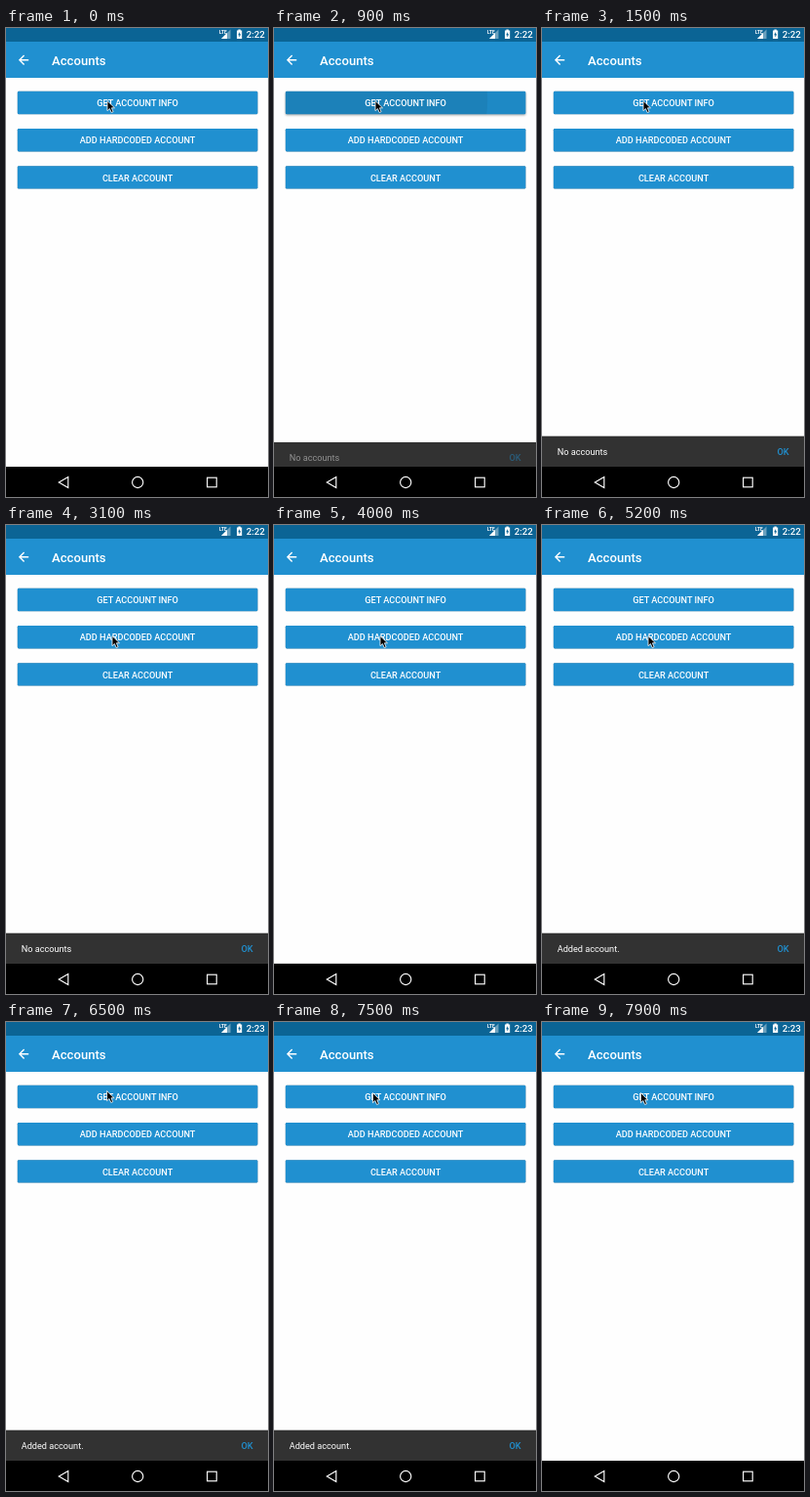
These frames come from a looping animation (269 by 480 pixels, 8 s). An HTML page:

```html
<!DOCTYPE html>
<html lang="en">
<head>
<meta charset="utf-8">
<title>Accounts</title>
<style>
  html, body { margin: 0; height: 100%; overflow: hidden; background: #fefefe; }
  svg { display: block; width: 100vw; height: 100vh; }
  text { font: 500 9.16px Roboto, sans-serif; fill: #fff; }
  .button text { text-anchor: middle; }
  .line { fill: none; stroke: #fff; stroke-width: 1.15; }
</style>
</head>
<body>
<svg viewBox="0 0 269 480">
  <rect width="269" height="480" fill="#fefefe"/>
  <rect width="269" height="51" fill="#2090d0"/>
  <rect width="269" height="14" fill="#0b6495"/>

  <!-- status bar -->
  <text x="219" y="5.6" style="font-size:4.8px;font-weight:700">LTE</text>
  <path d="M221 11H230.5V1.5Z" fill="#fff" opacity=".4"/>
  <path d="M221 11H227V5Z" fill="#fff"/>
  <path d="M237 2.6h1.4V1.6h2.4v1H242.2V11H237Z" fill="#fff"/>
  <path d="M240 4L238.2 7.3H239.4V9.8L241.2 6.3H240Z" fill="#0b6495"/>
  <text id="clock" x="265.8" y="10" text-anchor="end" style="font-size:9.7px">2:22</text>

  <!-- app bar -->
  <path class="line" style="stroke-width:1.4" d="M23.2 32.7H14M18.6 28L13.9 32.7L18.6 37.4"/>
  <text x="47" y="37.6" style="font-size:13.1px">Accounts</text>

  <g id="buttons"></g>

  <g id="snackbar">
    <rect y="449" width="269" height="32" fill="#323232"/>
    <g id="message">
      <text id="note" x="15.7" y="468.3" style="font-weight:400"></text>
      <text x="253.5" y="468.3" text-anchor="end" style="fill:#2090d0">OK</text>
    </g>
  </g>

  <!-- navigation bar -->
  <rect y="449" width="269" height="31"/>
  <path class="line" d="M54.3 465L63.8 459.6V470.4Z"/>
  <circle class="line" cx="135.2" cy="465" r="5.6"/>
  <rect class="line" x="206.6" y="460.2" width="9.6" height="9.6"/>

  <path id="cursor" d="M0 0V10.2L2.4 8L4.2 12L6.1 11.2L4.4 7.3H7.5Z" stroke="#fff" stroke-width=".8"/>
</svg>
<script>
const LOOP = 8000, STEP = 100;
const $ = id => document.getElementById(id);
const clamp = v => Math.min(1, Math.max(0, v));
const span = (t, start, length) => clamp((t - start) / length);

// cubic-bezier(.4, 0, .2, 1)
function ease(x) {
  let lo = 0, hi = 1;
  for (let i = 0; i < 20; i++) {
    const s = (lo + hi) / 2, r = 1 - s;
    if (1.2 * r * r * s + .6 * r * s * s + s ** 3 < x) lo = s; else hi = s;
  }
  return lo * lo * (3 - 2 * lo);
}

const buttons = [
  { label: 'GET ACCOUNT INFO', press: 600, touch: [104, 74] },
  { label: 'ADD HARDCODED ACCOUNT', press: 4400, touch: [109, 113.5] },
  { label: 'CLEAR ACCOUNT', press: Infinity, touch: [0, 0] }
];
const notes = [
  { text: 'No accounts', show: 770, hide: 3770 },
  { text: 'Added account.', show: 4570, hide: 7570 }
];
const moves = [
  { start: 2300, length: 800, to: [109, 113.5] },
  { start: 5700, length: 800, to: [103.6, 70.5] },
  { start: 6600, length: 300, to: [101.4, 72.5] }
];

$('buttons').innerHTML = buttons.map(({ label, touch: [x, y] }, i) => {
  const box = `<rect x="11.8" y="${64.8 + 38.2 * i}" width="246.6" height="23.4" rx="1.3"`;
  return `<clipPath id="clip${i}">${box}/></clipPath>
    <g class="button">${box} class="face" fill="#2090d0"/>
    <g class="ink" clip-path="url(#clip${i})">${box} opacity=".05"/>
    <circle cx="${x}" cy="${y}" opacity=".06"/></g>
    <text x="135.1" y="${80.1 + 38.2 * i}">${label}</text></g>`;
}).join('');
const groups = document.querySelectorAll('.button');

function drawButton({ press }, i, t) {
  const down = span(t, press - 60, 160), up = span(t, press + 300, 400);
  const force = down * (1 - up);
  const part = name => groups[i].querySelector(name);
  part('.face').style.filter =
    `drop-shadow(0 ${.9 + force * .7}px ${.6 + force * .7}px rgba(0,0,0,.36))`;
  part('.ink').setAttribute('opacity', force);
  part('circle').setAttribute('r', 160 * span(t, press - 60, 500));
}

function draw(t) {
  buttons.forEach((b, i) => drawButton(b, i, t));

  const note = notes[t < 4400 ? 0 : 1];
  const rise = ease(span(t, note.show, 250)) - ease(span(t, note.hide, 250));
  $('note').textContent = note.text;
  $('snackbar').setAttribute('transform', `translate(0 ${-31.3 * rise})`);
  $('message').setAttribute('opacity',
    ease(span(t, note.show + 70, 180)) - ease(span(t, note.hide, 180)));

  let pos = [104, 74.5];
  for (const { start, length, to } of moves) {
    const k = ease(span(t, start, length));
    pos = pos.map((v, i) => v + (to[i] - v) * k);
  }
  $('cursor').setAttribute('transform', `translate(${pos})`);
  $('clock').textContent = t < 6000 ? '2:22' : '2:23';
}

function frame() {
  draw(Math.floor(performance.now() % LOOP / STEP) * STEP);
  requestAnimationFrame(frame);
}
frame();
</script>
</body>
</html>
```
